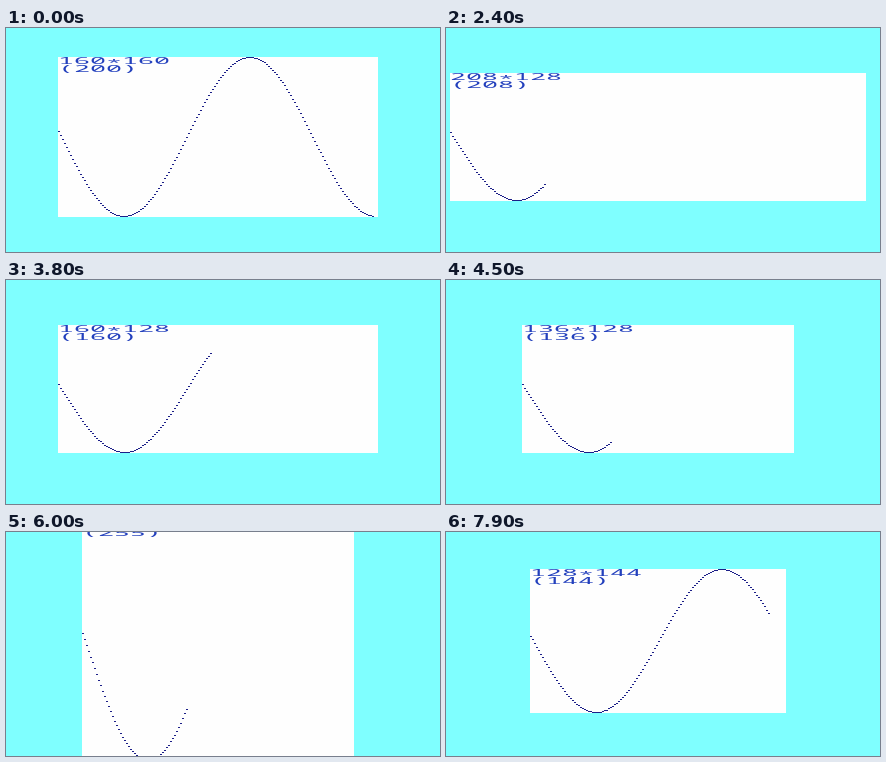
Write an HTML page that moves like this. It is 434x224 px and loops after 8 s.

```html
<!DOCTYPE html>
<html lang="en">
<head>
<meta charset="utf-8">
<title>Resolution plotter</title>
<style>
  html, body { margin: 0; width: 100%; height: 100%; overflow: hidden; background: #7fffff; }
  svg { display: block; width: 434px; height: 224px; }
  text { font: 9.8px "Noto Sans Mono", "DejaVu Sans Mono", monospace; fill: #2340bd; }
</style>
</head>
<body>
<svg viewBox="0 0 434 224">
  <rect id="page" fill="#fefefe" shape-rendering="crispEdges"/>
  <path id="curve" fill="#1c1f88" shape-rendering="crispEdges"/>
  <g id="label">
    <text y="7"><tspan id="wide"></tspan><tspan dy="1.5">*</tspan><tspan id="high" dy="-1.5"></tspan></text>
    <text id="cells" y="15"></text>
  </g>
</svg>
<script>
const LOOP = 8000, STEP = 100;
const el = id => document.getElementById(id);
const [page, curve, label, wide, high, cells] =
  ["page", "curve", "label", "wide", "high", "cells"].map(el);

// Each leg walks through screen modes; a repeated mode means a limit was hit.
const legs = [
  { start: -200, end: 903, modes: "160*160 168*160 176*160 184*160 184*144" },
  { start: 903, end: 2343, modes: "192*144 200*144 208*144 208*128 216*128 216*128" },
  { start: 2343, end: 3705, modes: "208*128 200*128 192*128 184*128 176*128 168*128" },
  { start: 3705, end: 5158, modes: "160*128 152*128 144*128 136*128 136*128 136*144 136*160 136*176" },
  { start: 5158, end: 6884, modes: "136*192 136*208 136*224 136*240 136*240 128*240 128*256 128*256 128*240" },
  { start: 6884, end: 7911, modes: "128*224 128*208 128*192 128*176 128*160 128*144" }
];

// Plotting time grows with the columns, and a little with the height.
const cost = ({ w, h }) => w * (0.88 + 0.0025 * h);

const schedule = legs.flatMap(({ start, end, modes }) => {
  const list = modes.split(" ").map(name => {
    const [w, h] = name.split("*").map(Number);
    return { w, h };
  });
  const scale = (end - start) / list.reduce((sum, mode) => sum + cost(mode), 0);
  let at = start;
  return list.map(mode => {
    const item = { ...mode, start: at, length: cost(mode) * scale };
    at += item.length;
    return item;
  });
});

function plot(x0, w, h, count) {
  let d = "";
  for (let i = 0; i < count; i++) {
    const y = Math.floor(109 + (h / 2 - 0.5) * Math.sin((i - 1.3) / 20));
    d += `M${x0 + 2 * i} ${y}h2v1h-2z`;
  }
  return d;
}

function draw(time) {
  const t = Math.floor((time % LOOP) / STEP) * STEP;
  const { w, h, start, length } = schedule.findLast(mode => mode.start <= t);
  const x = Math.max(4, 212 - w), y = 109 - h / 2;
  const count = Math.min(w, Math.floor(w * (t - start) / length) + 1);

  page.setAttribute("x", x);
  page.setAttribute("y", y);
  page.setAttribute("width", 2 * w);
  page.setAttribute("height", h);
  curve.setAttribute("d", plot(x, w, h, count));

  // Screen pixels are wide, so the lettering is too.
  label.setAttribute("transform", `translate(${x} ${y}) scale(2.72 1)`);
  wide.textContent = w;
  high.textContent = h;
  cells.textContent = `(${w * h / 128})`;
}

const origin = performance.now();
function tick() {
  draw(performance.now() - origin);
  requestAnimationFrame(tick);
}
tick();
</script>
</body>
</html>
```
